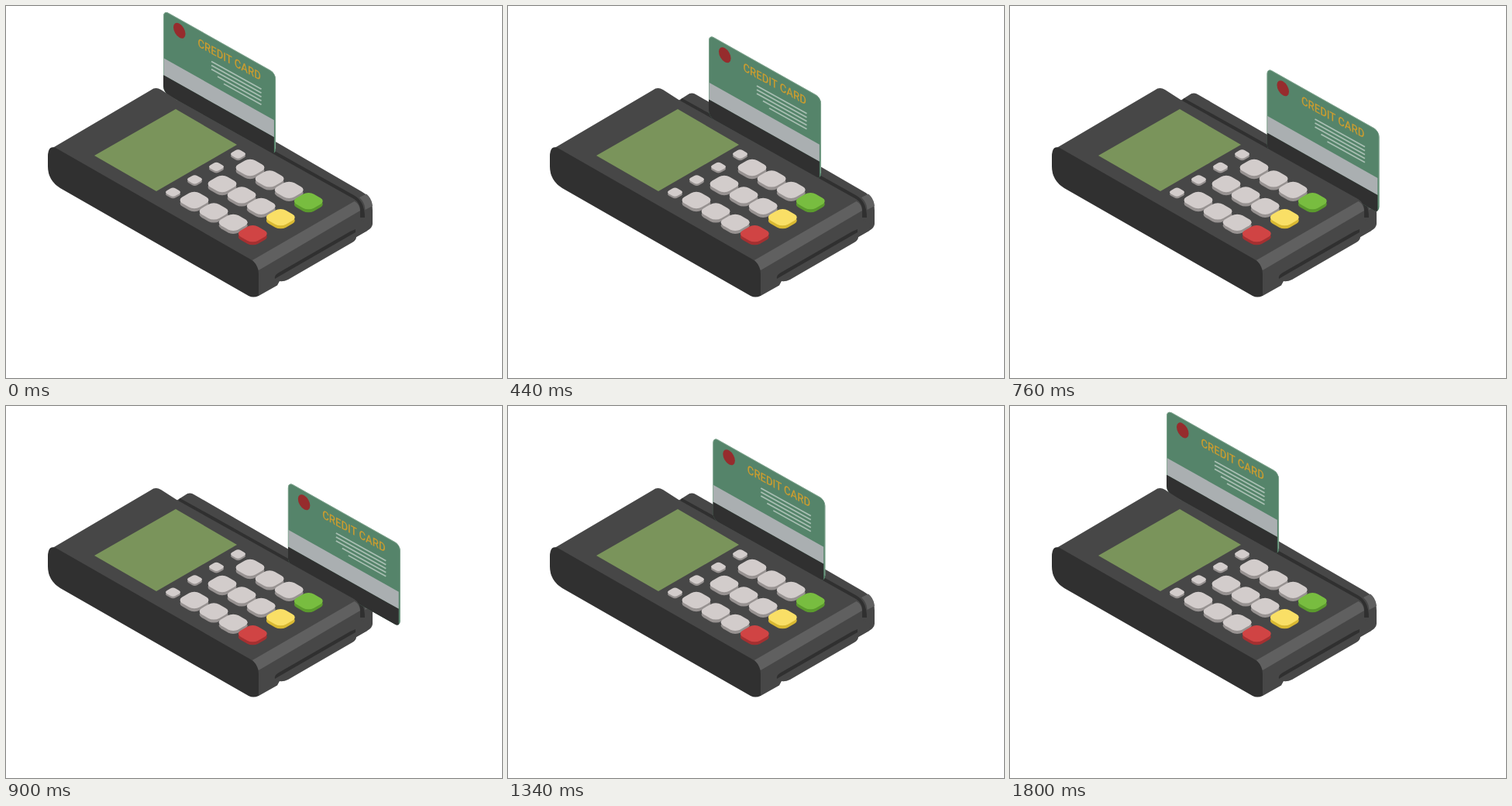
Animation of 640 by 480 pixels, one loop 1940 ms. Source, as an HTML page:

```html
<!DOCTYPE html>
<html lang="en">
<head>
<meta charset="utf-8">
<title>Card swipe</title>
<style>
html, body { margin: 0; width: 100%; height: 100%; overflow: hidden; background: #fff; }
svg { display: block; }
text { font: 500 15.2px Roboto, Arial, sans-serif; }
</style>
</head>
<body>
<svg width="640" height="480" viewBox="0 0 640 480">
  <!-- rear rail and slot -->
  <path fill="#474747" d="M220 122L231 115Q237 110.500 243 114.500L459 239.500Q473 247 473 264V281Q473 286 466 290L440 305L300 200Z"/>
  <path fill="#606060" d="M456 247L465 242.500Q472 248 473 258L463.500 263Q463 253 456 247Z"/>
  <path fill="none" stroke="#303030" stroke-width="6" d="M223 121.500L448 247Q460 254 460 273"/>

  <g id="card">
    <!-- card plane: x runs along the slot, y stays vertical -->
    <g transform="matrix(.866 .487 0 1 203 5)">
      <clipPath id="edge"><rect width="167.500" height="106.500" rx="8"/></clipPath>
      <g clip-path="url(#edge)">
        <rect width="168" height="107" fill="#55846a"/>
        <rect y="62" width="165" height="22" fill="#aaafb1"/>
        <rect y="84" width="165" height="23" fill="#303030"/>
        <path fill="none" stroke="#86a994" stroke-width="2" d="M0 84V8Q0 0 8 0H159.500Q167.500 0 167.500 8V98"/>
      </g>
      <circle cx="24" cy="15" r="9" fill="#962c2d"/>
    </g>
    <text transform="matrix(.866 .472 0 1 247.500 52)" fill="#c99c30">CREDIT CARD</text>
    <g id="lines" stroke="#a9bfb3" stroke-width="1.700"></g>
  </g>

  <!-- front body -->
  <path fill="#474747" d="M54 195Q54 186 62 182L187 108.500Q193 104 200 108L221 121.500L449 249Q457 253.500 457 264V275L468 281L466 290L452 298Q452 302 447 305L364 353Q358 356 353 355L350 360.500L326 374L200 270Z"/>
  <path fill="#606060" d="M318 328L449.500 252Q456 255 457 264L326 341Z"/>
  <path fill="#303030" d="M54 195Q54 179 64 183L314 326Q326 332 326 347V374Q319 377 313 374L70 235Q54 225 54 207Z"/>
  <path fill="#303030" d="M347 352Q346 347 352 344L444 291L451 288V292L352 349Z"/>
  <path fill="#7a945b" d="M219 133L298 179L194 239L114 193Z"/>
  <g id="keys"></g>
</svg>
<script>
const byId = id => document.getElementById(id);

byId('lines').innerHTML = [265, 265, 265, 273, 281].map((x, i) => {
  const y = 71.5 + i * 5 + (x - 265) * .555;
  return `<path d="M${x} ${y}L329.500 ${y + (329.5 - x) * .555}"/>`;
}).join('');

const isoSquare = (x, y, size, r, fill) =>
  `<rect x="${-size / 2}" y="${-size / 2}" width="${size}" height="${size}" rx="${r}" fill="${fill}"
    transform="matrix(.866 .5 -.866 .5 ${x} ${y})"/>`;

function key(x, y, face = '#d2cccb', side = '#979291', small = false) {
  const [size, r, depth] = small ? [13.3, 4, 2.5] : [26, 8, 4];
  return isoSquare(x, y + depth, size, r, side) + isoSquare(x, y, size, r, face);
}

const endKeys = [['#78bd40', '#5b9a2d'], ['#f9df66', '#d8b832'], ['#d04444', '#a43031']];
let keys = '';
for (let row = 0; row < 4; row++)
  keys += key(299.5 - row * 28, 191 + row * 16.4, undefined, undefined, true);
for (let row = 0; row < 3; row++)
  for (let col = 0; col < 4; col++)
    keys += key(315 + col * 25.1 - row * 36, 208.5 + col * 14.4 + row * 21,
      ...(col === 3 ? endKeys[row] : []));
byId('keys').innerHTML = keys;

// [time, x, y]; the first and last entries only set the end slopes
const out = [[-300, 29, 14], [0, 0, 0], [300, 29, 14], [540, 78, 46], [600, 91.5, 54],
  [907, 162.4, 93.4], [1214, 233, 133]];
const back = [[754, 198, 116], [907, 162.4, 93.4], [1060, 127, 71.5], [1340, 61.3, 34.5],
  [1620, 11, 9], [1800, -1, -.3], [1980, 8, 7]];

function position(t) {
  const path = t < 907 ? out : back;
  let i = 1;
  while (i < path.length - 3 && t >= path[i + 1][0]) i++;
  const [a, b, c, d] = path.slice(i - 1, i + 3);
  const span = c[0] - b[0], s = Math.min(1, (t - b[0]) / span);
  return [1, 2].map(k => {
    const v0 = (c[k] - a[k]) / (c[0] - a[0]) * span;
    const v1 = (d[k] - b[k]) / (d[0] - b[0]) * span;
    const rise = c[k] - b[k];
    return b[k] + s * (v0 + s * (3 * rise - 2 * v0 - v1 + s * (v0 + v1 - 2 * rise)));
  });
}

const start = performance.now();
function draw() {
  const t = Math.floor((performance.now() - start) % 1940 / 20) * 20;
  byId('card').setAttribute('transform', `translate(${position(t)})`);
  requestAnimationFrame(draw);
}
draw();
</script>
</body>
</html>
```
